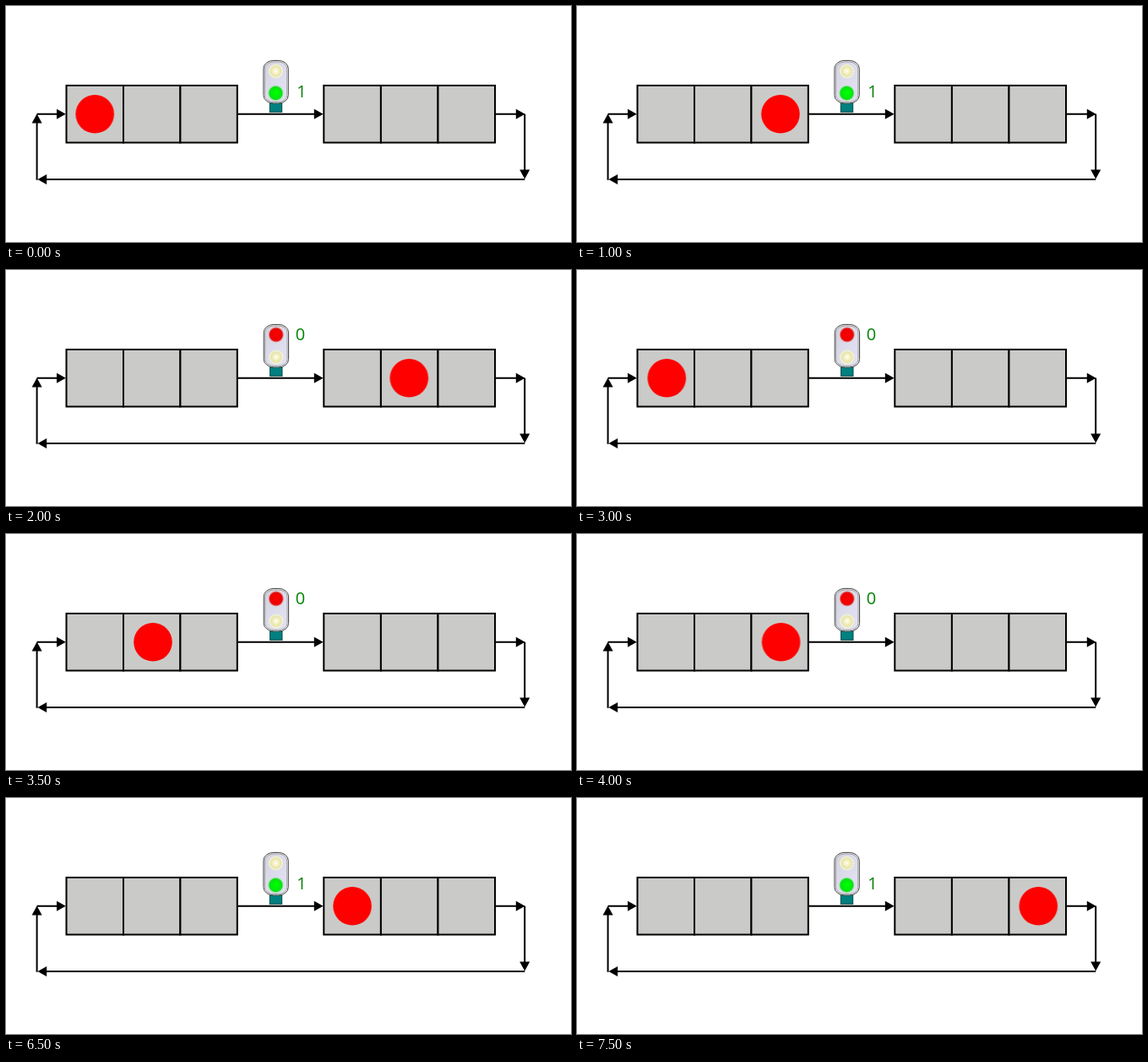
Animation, 669 px wide and 279 px high, one loop 8 s. Source, as an HTML page:

```html
<!DOCTYPE html>
<html lang="en">
<head>
<meta charset="utf-8">
<title>Token and signal loop</title>
<style>
html, body { margin: 0; width: 100%; height: 100%; overflow: hidden; background: #fff; }
svg { display: block; width: 669px; height: 279px; }
.cell { fill: #cacbc8; stroke: #000; stroke-width: 2; }
.line { fill: none; stroke: #000; stroke-width: 2; }
text { font: 20px "Open Sans", "Noto Sans", sans-serif; fill: #008000; }
.ball { fill: #f00; animation: hop 8s step-end infinite; }
.go { animation: go 8s step-end infinite; }
.stop { animation: stop 8s step-end infinite; }
.edge { fill: none; stroke: #000; stroke-width: 2.3; visibility: hidden; animation: edge 8s step-end infinite; }
@keyframes hop {
  0% { transform: translateX(105.2px); }
  6.25% { transform: translateX(173.1px); }
  12.5% { transform: translateX(240.9px); }
  18.75% { transform: translateX(409.8px); }
  25% { transform: translateX(477.3px); }
  31.25% { transform: translateX(545.8px); }
  37.5% { transform: translateX(106.3px); }
  43.75% { transform: translateX(174px); }
  50% { transform: translateX(241.6px); }
  81.25% { transform: translateX(410.1px); }
  87.5% { transform: translateX(478px); }
  93.75%, 100% { transform: translateX(546.3px); }
}
@keyframes go {
  0% { visibility: visible; }
  25% { visibility: hidden; }
  75%, 100% { visibility: visible; }
}
@keyframes stop {
  0% { visibility: hidden; }
  25% { visibility: visible; }
  75%, 100% { visibility: hidden; }
}
@keyframes edge {
  0% { visibility: hidden; }
  75% { visibility: visible; }
  81.25%, 100% { visibility: hidden; }
}
</style>
</head>
<body>
<svg viewBox="0 0 669 279">
  <defs>
    <linearGradient id="shell" x1="0" y1="0" x2="1" y2="1">
      <stop offset="0" stop-color="#d2d2e0"/>
      <stop offset=".5" stop-color="#dcdcec"/>
      <stop offset="1" stop-color="#e2e2f2"/>
    </linearGradient>
    <radialGradient id="off">
      <stop offset="0" stop-color="#fffff0"/>
      <stop offset=".3" stop-color="#f6f4cc"/>
      <stop offset=".72" stop-color="#e6e2a8"/>
      <stop offset=".82" stop-color="#f3f1d0"/>
      <stop offset="1" stop-color="#eeeedc"/>
    </radialGradient>
    <radialGradient id="green">
      <stop offset="0" stop-color="#0f0"/>
      <stop offset=".6" stop-color="#00ee0a"/>
      <stop offset=".8" stop-color="#14dc1c"/>
      <stop offset="1" stop-color="#b4e8bc" stop-opacity=".4"/>
    </radialGradient>
    <radialGradient id="red">
      <stop offset="0" stop-color="#f00"/>
      <stop offset=".6" stop-color="#ee0000"/>
      <stop offset=".8" stop-color="#e01414"/>
      <stop offset="1" stop-color="#f0b4b4" stop-opacity=".4"/>
    </radialGradient>
    <path id="head" d="M0 0L-10.8 -6V6Z"/>
    <g id="signal">
      <rect x="312.3" y="114.5" width="14.4" height="10.8" fill="#008080" stroke="#004848"/>
      <rect x="304.9" y="64.4" width="29.4" height="50.6" rx="12" ry="9.5" fill="#fff" stroke="#444" stroke-width="1"/>
      <rect x="306.4" y="65.9" width="26.4" height="47.6" rx="10.5" ry="8.2" fill="url(#shell)" stroke="#777" stroke-width=".7"/>
    </g>
  </defs>

  <g class="cell">
    <rect x="71.5" y="94" width="67.5" height="67.5"/>
    <rect x="139" y="94" width="67.4" height="67.5"/>
    <rect x="206.4" y="94" width="67.4" height="67.5"/>
    <rect x="376.3" y="94" width="67.6" height="67.5"/>
    <rect x="443.9" y="94" width="67.6" height="67.5"/>
    <rect x="511.5" y="94" width="67.5" height="67.5"/>
  </g>
  <rect class="edge" x="206.5" y="94.2" width="67.4" height="67.5"/>

  <path class="line" d="M274 127.8H366M579 127.8H605M614.2 127.8V195M614.2 205H47M36.6 205.8V137M36.6 127.8H62"/>
  <use href="#head" transform="translate(375.6 127.8)"/>
  <use href="#head" transform="translate(614.6 127.8)"/>
  <use href="#head" transform="translate(614.2 204.4) rotate(90)"/>
  <use href="#head" transform="translate(37.4 205) rotate(180)"/>
  <use href="#head" transform="translate(36.6 127.6) rotate(-90)"/>
  <use href="#head" transform="translate(70.8 127.8)"/>

  <g class="go">
    <use href="#signal"/>
    <circle cx="319.4" cy="77" r="8.6" fill="url(#off)"/>
    <circle cx="319.4" cy="103" r="9.4" fill="url(#green)"/>
    <text x="344.2" y="108">1</text>
  </g>
  <g class="stop">
    <use href="#signal" x=".3"/>
    <circle cx="319.8" cy="76.5" r="9.4" fill="url(#red)"/>
    <circle cx="319.8" cy="103" r="8.6" fill="url(#off)"/>
    <text x="342.8" y="83">0</text>
  </g>

  <circle class="ball" cy="127.8" r="22.8"/>
</svg>
</body>
</html>
```
